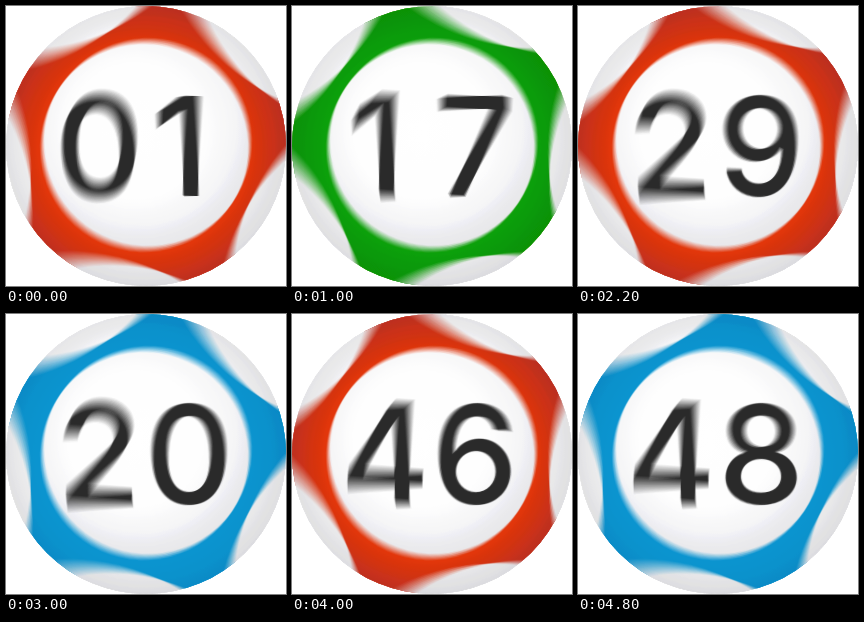
These frames come from a looping animation (280x280 px, 4.9 s). An HTML page with a canvas:

```html
<!DOCTYPE html>
<html lang="en">
<head>
<meta charset="utf-8">
<title>Lottery ball</title>
<style>
  html, body { margin: 0; width: 100%; height: 100%; overflow: hidden; background: #fff; }
  canvas { display: block; }
</style>
</head>
<body>
<canvas id="stage" width="280" height="280"></canvas>
<script>
const STEP = 100, COUNT = 49, PAD = 60;
const PIVOT = { x: 190, y: 172 };
const BLUR = 0.14, SAMPLES = 21;

// The band turns steadily and takes the next colour every half second or so
const TURN = 12, FIRST_TURN = 28, HOLD = 6;
const TONES = [
  ['#e03204', '#b3281c'],
  ['#0a9d02', '#078a00'],
  ['#0491cd', '#0085bf']
];

const NUMBERS = (
  '01 06 03 08 05 02 09 04 07 ' +
  '12 17 10 14 19 11 16 13 15 18 ' +
  '23 27 21 29 25 22 28 24 31 26 36 20 ' +
  '33 38 30 35 39 32 37 34 ' +
  '42 46 40 44 49 41 47 43 45 48').split(' ');

// 30 steps in, the two last twenties change places with thirties
const ctx = document.getElementById('stage').getContext('2d');
const layer = document.createElement('canvas');
layer.width = layer.height = 280 + 2 * PAD;
const pen = layer.getContext('2d');
pen.translate(PAD, PAD);

function disc(x, y, r, fill) {
  pen.beginPath();
  pen.arc(x, y, r, 0, 2 * Math.PI);
  pen.fillStyle = fill;
  pen.fill();
}

function shade(x, y, r, stops) {
  const g = pen.createRadialGradient(x, y, 0, x, y, r);
  stops.forEach(([at, tone]) => g.addColorStop(at, tone));
  return g;
}

function digit(ch, x) {
  pen.fillText(ch, ch === '1' ? x - 8 : x, 190);
}

function paintLayer(i) {
  const [bright, dark] = TONES[Math.floor(i / HOLD) % TONES.length];
  const cx = 140, cy = 140;

  pen.fillStyle = shade(138, 142, 146, [[0, bright], [0.7, bright], [1, dark]]);
  pen.fillRect(-PAD, -PAD, layer.width, layer.height);

  const pale = shade(138, 132, 155, [[0, '#fff'], [0.7, '#f1f1f2'], [1, '#d2d2d5']]);
  for (let k = 0; k < 5; k++) {
    const a = (FIRST_TURN + TURN * i + 72 * k) * Math.PI / 180;
    disc(cx + 328 * Math.cos(a), cy + 328 * Math.sin(a), 210, pale);
  }

  disc(140, 139, 104, shade(132, 122, 124, [[0, '#fff'], [0.55, '#fdfdfd'], [1, '#e1e1e5']]));

  pen.fillStyle = '#262626';
  pen.font = '550 137px Inter, "Liberation Sans", sans-serif';
  pen.textAlign = 'center';
  digit(NUMBERS[i][0], 93);
  digit(NUMBERS[i][1], 183);
}

// Averages the layer over a small arc around the pivot
function paint(i) {
  paintLayer(i);
  ctx.clearRect(0, 0, 280, 280);
  ctx.save();
  ctx.beginPath();
  ctx.arc(140, 140, 140, 0, 2 * Math.PI);
  ctx.clip();
  for (let k = 0; k < SAMPLES; k++) {
    ctx.save();
    ctx.globalAlpha = 1 / (k + 1);
    ctx.translate(PIVOT.x, PIVOT.y);
    ctx.rotate((k / (SAMPLES - 1) - 0.5) * BLUR);
    ctx.drawImage(layer, -PIVOT.x - PAD, -PIVOT.y - PAD);
    ctx.restore();
  }
  ctx.restore();
}

let shown = -1;
const start = performance.now();
function tick() {
  const i = Math.floor(Math.max(0, performance.now() - start) / STEP) % COUNT;
  if (i !== shown) paint(shown = i);
  requestAnimationFrame(tick);
}
tick();
</script>
</body>
</html>
```
